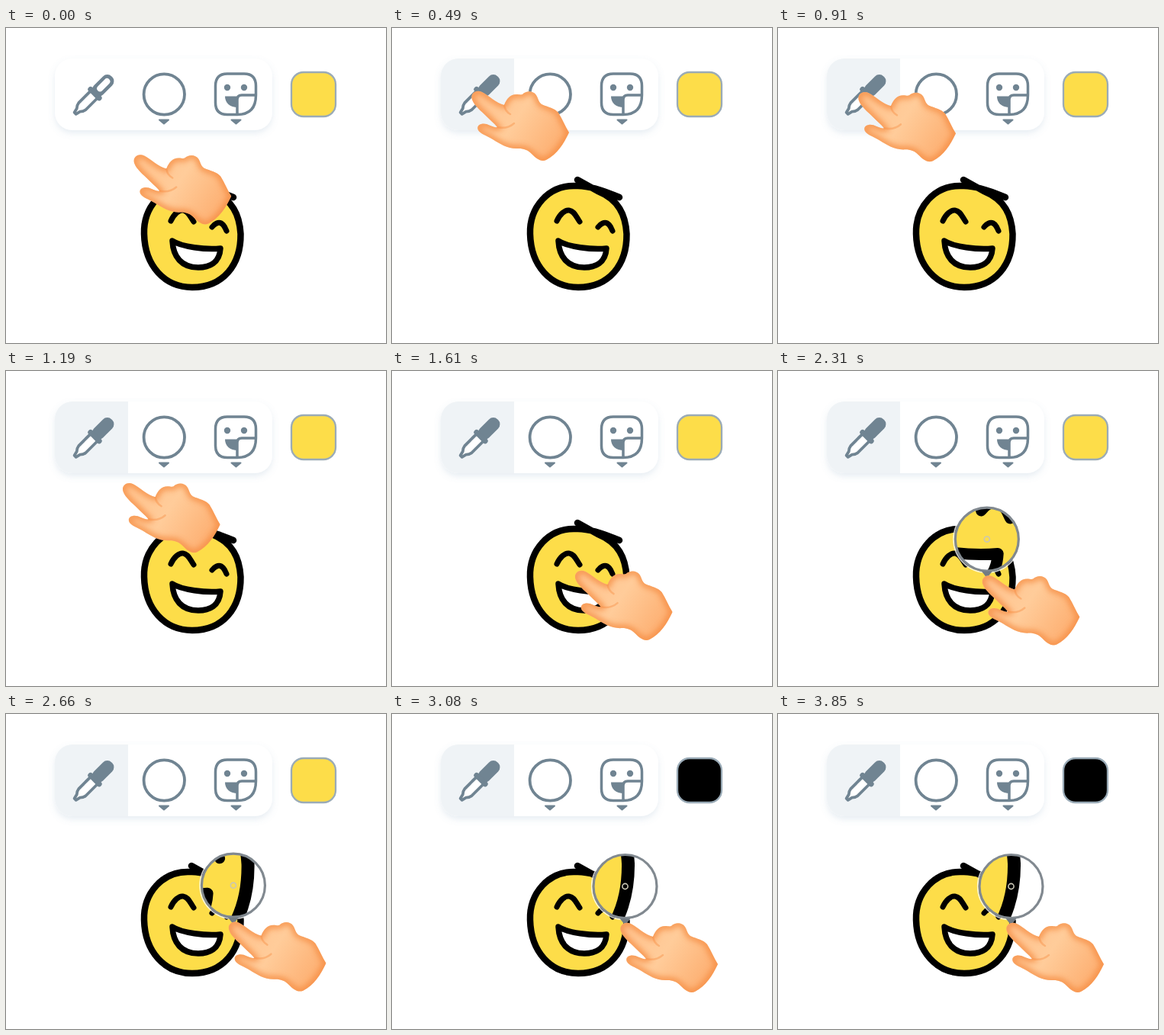
Recreate the animation shown at these times as an HTML page. Size 498x413 px, loop 3920 ms.

```html
<!DOCTYPE html>
<html lang="en">
<head>
<meta charset="utf-8">
<title>Colour picker</title>
<style>
  html, body { margin: 0; width: 100%; height: 100%; overflow: hidden; background: #fff; }
  svg { display: block; width: 498px; height: 413px; }
  .line { fill: none; stroke: #708492; stroke-width: 3.8; stroke-linejoin: round; stroke-linecap: round; }
  .solid { fill: #708492; }
  .arrow { fill: #708492; stroke: #708492; stroke-width: 2; stroke-linejoin: round; }
</style>
</head>
<body>
<svg viewBox="0 0 498 413">
  <defs>
    <filter id="panelShadow" x="-20%" y="-30%" width="140%" height="180%">
      <feDropShadow dx="0" dy="4" stdDeviation="4" flood-color="#6e96b4" flood-opacity=".17"/>
    </filter>
    <filter id="soft" x="-20%" y="-20%" width="140%" height="140%"><feGaussianBlur stdDeviation="3.5"/></filter>
    <linearGradient id="skin" gradientUnits="userSpaceOnUse" x1="0" y1="0" x2="116" y2="76">
      <stop offset="0" stop-color="#ffc18b"/>
      <stop offset=".5" stop-color="#ffcc9a"/>
      <stop offset="1" stop-color="#fdae70"/>
    </linearGradient>
    <clipPath id="panelClip"><rect x="64" y="40" width="285" height="94" rx="23"/></clipPath>
    <clipPath id="lensClip"><circle r="41"/></clipPath>
    <path id="handShape" d="M1 11C-2 3 6-3 14 1C22 5 33 16 43 18C46 10 51 4 59 4C63 4 65 5 67 4C72-1 81-1 85 5C88 10 88 14 92 17C101 21 109 22 114 28C119 36 123 46 128 54C121 69 112 83 98 90C91 93 85 88 79 82C74 77 69 75 62 75C48 76 38 69 28 63C20 58 12 56 9 51C6 45 12 41 20 43C26 45 30 48 34 47C30 42 24 37 20 33C12 25 4 19 1 11Z"/>
    <clipPath id="handClip"><use href="#handShape"/></clipPath>
    <g id="face" stroke="#000" stroke-linecap="round" stroke-linejoin="round">
      <path fill="#fddd49" stroke-width="8.500" d="M298 222C275 212 255 206 240 207C205 206 180 235 181 270C182 312 208 340 244 340C285 340 308 310 307.500 270C306 245 297 225 270 214L243 199"/>
      <path fill="none" stroke-width="7" d="M216 253C220 244 227 238 232 239C239 240 241 247 246 254M270 261C273 257 278 254 282 256C286 258 287 262 289 266"/>
      <path fill="#fff" stroke-width="7.500" d="M218 279C230 287 262 291 281 289C280 308 266 314 252 314C230 314 219 300 218 279Z"/>
    </g>
  </defs>

  <rect width="498" height="413" fill="#fff"/>
  <rect x="64" y="40" width="285" height="94" rx="23" fill="#fff" filter="url(#panelShadow)"/>
  <rect id="highlight" x="64" y="40" width="96" height="94" fill="#eff3f6" clip-path="url(#panelClip)"/>

  <g transform="translate(114 88.5) rotate(-45)">
    <path class="line" style="fill:#fff" d="M3-6.500H-20Q-24-6-27-3L-33-1.500V1.500L-27 3Q-24 6-20 6.500H3Z"/>
    <rect class="solid" x="2" y="-8.500" width="33" height="17" rx="8"/>
    <rect class="solid" x="0" y="-11.500" width="7" height="23" rx="3.500"/>
    <rect id="hollow" x="9" y="-4" width="21" height="8" rx="4" fill="#fff"/>
  </g>

  <circle class="line" cx="207.300" cy="87" r="26.700"/>
  <path class="arrow" d="M201 120.500H213L207 125.500Z"/>

  <path class="line" d="M290 60H312Q327.500 60 327.500 76V88Q327.500 113.500 303 113.500H290Q274.500 113.500 274.500 98V76Q274.500 60 290 60ZM303 113V94Q303 88 309 88H327" style="stroke-width:3.500"/>
  <circle class="solid" cx="290" cy="78" r="4.200"/>
  <circle class="solid" cx="312" cy="78" r="4.200"/>
  <path class="solid" d="M287 89.500H304V104C293 104 287 98 287 89.500Z"/>
  <path class="arrow" d="M295.500 120.500H307.500L301.500 125.500Z"/>

  <rect id="swatch" x="374" y="58" width="58" height="58" rx="16" stroke="#9aabb7" stroke-width="2.300"/>

  <use href="#face"/>

  <g id="lens">
    <circle r="43.800" fill="none" stroke="#fff" stroke-width="1.600" stroke-opacity=".8"/>
    <g clip-path="url(#lensClip)">
      <circle r="42" fill="#fff"/>
      <use id="zoomed" href="#face"/>
    </g>
    <circle r="41.500" fill="none" stroke="#818990" stroke-width="3.200"/>
    <path d="M-7 42H7L0 51Z" fill="#727b83"/>
    <circle r="3.600" fill="none" stroke="#c9c6b4" stroke-width="1.600"/>
  </g>

  <g id="hand">
    <use href="#handShape" fill="url(#skin)"/>
    <g clip-path="url(#handClip)" fill="none" stroke="#f58a40">
      <use href="#handShape" stroke-width="9" opacity=".75" filter="url(#soft)"/>
      <path d="M43 18Q44 26 51 30M34 47Q47 50 56 42" stroke-width="2.500" stroke-linecap="round" opacity=".4"/>
    </g>
  </g>
</svg>
<script>
  const LOOP = 3920, STEP = 70, ZOOM = 2;
  const BUTTON = [104, 83], FACE = [241, 264], EDGE = [299, 274];
  const $ = id => document.getElementById(id);
  const show = (id, on) => $(id).style.display = on ? '' : 'none';

  // Start time, end time, from, to
  const moves = [
    [-417, 378, FACE, BUTTON],
    [867, 1662, BUTTON, FACE],
    [1750, 2940, FACE, EDGE]
  ];

  function fingertip(t) {
    const [start, end, from, to] = moves.filter(m => t >= m[0]).pop();
    const u = Math.min(1, (t - start) / (end - start));
    const eased = (1 - Math.cos(Math.PI * u)) / 2;
    return from.map((v, i) => v + (to[i] - v) * eased);
  }

  function draw(t) {
    const [x, y] = fingertip(t);
    const picked = t >= 420;
    $('hand').setAttribute('transform', `translate(${x} ${y})`);
    $('lens').setAttribute('transform', `translate(${x + 6.5} ${y - 48})`);
    $('zoomed').setAttribute('transform', `scale(${ZOOM}) translate(${-x - 6.5} ${-y - 11})`);
    show('highlight', picked);
    show('hollow', !picked);
    show('lens', t >= 1820);
    $('swatch').setAttribute('fill', t >= 2870 ? '#000' : '#fddd49');
  }

  function tick() {
    const t = performance.now() % LOOP;
    draw(Math.floor(t / STEP) * STEP);
    requestAnimationFrame(tick);
  }
  tick();
</script>
</body>
</html>
```
